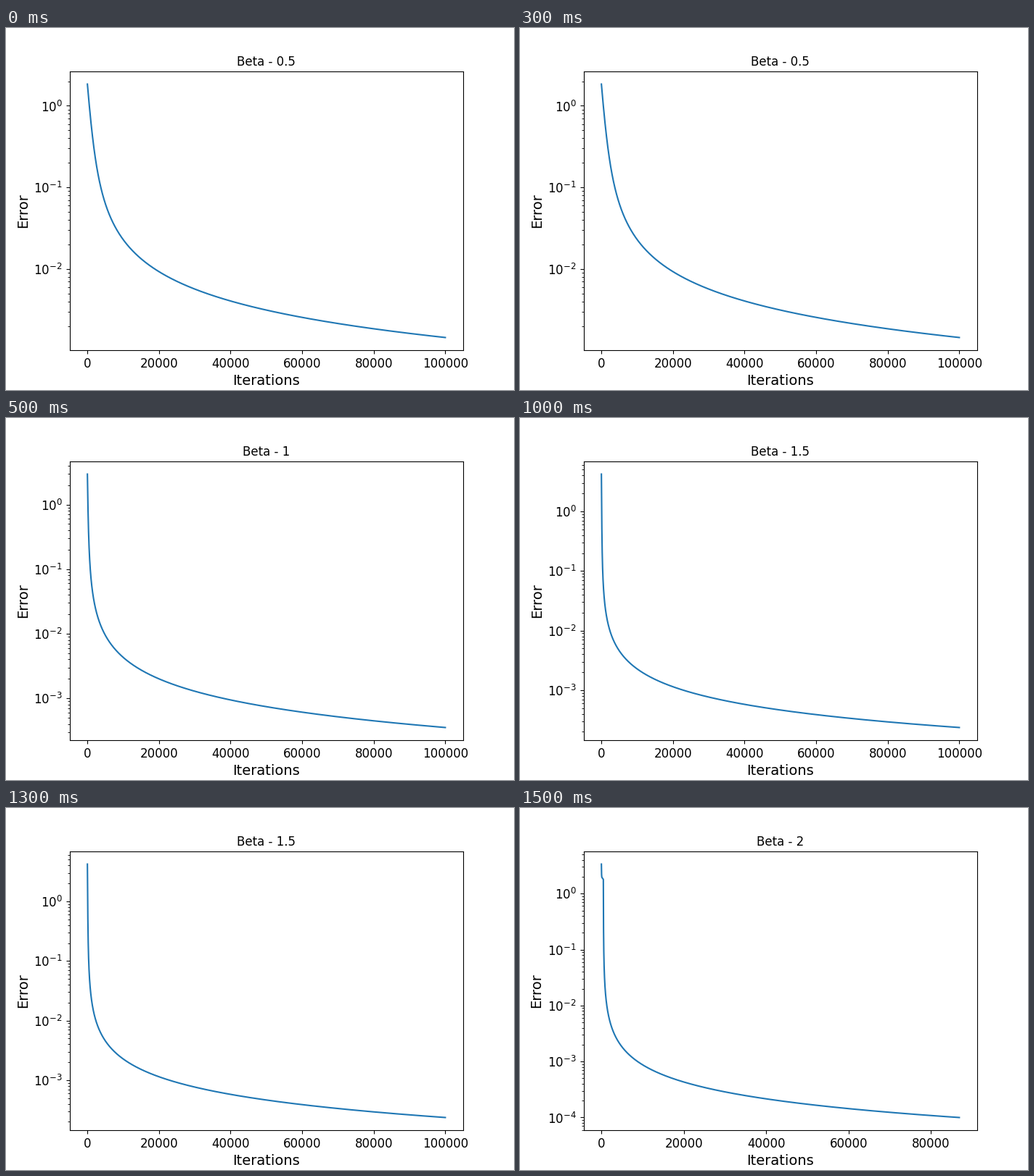
Animation of 700 by 500 pixels, one loop 2000 ms. Source, as a matplotlib script:

```python
import numpy as np
import matplotlib.pyplot as plt
from matplotlib.animation import FuncAnimation

plt.rcParams["font.family"] = "DejaVu Sans"


def decay(first, last, steps, power, tau):
    """Error falling exponentially (time scale tau), then as n**-power."""
    total = np.log(first / last)
    drop = np.linspace(0, total, 2000)
    scale = (steps - tau * total) / np.expm1(total / power)
    return tau * drop + scale * np.expm1(drop / power), first * np.exp(-drop)


def plateau(first, level, last, steps):
    """Quick drop to a shelf that sinks slowly towards the last value."""
    n = np.linspace(0, steps, 400)
    shelf = level + (last - level) * n / steps
    return n, shelf + (first - level) * np.exp(-n / 25)


def stalled_decay(first, level, edge, last, stall, steps, power, tau):
    n1, e1 = plateau(first, level, edge, stall)
    n2, e2 = decay(edge, last, steps - stall, power, tau)
    return np.append(n1, n2 + stall), np.append(e1, e2)


RUNS = [
    ("0.5", decay(1.845, 1.452e-3, 100000, 1.05, 746)),
    ("1", decay(2.958, 3.524e-4, 100000, 1.06, 100)),
    ("1.5", decay(4.227, 2.36e-4, 100000, 0.97, 46)),
    ("2", stalled_decay(3.373, 2.0, 1.8, 0.9999e-4, 470, 86850, 0.98, 12)),
]

fig, ax = plt.subplots(figsize=(7, 5), dpi=100)


def draw(i):
    beta, (steps, error) = RUNS[i]
    ax.clear()
    ax.semilogy(steps, error, color="#1f77b4", lw=1.5)
    ax.set_title(f"Beta - {beta}", fontsize=12)
    ax.set_xlabel("Iterations", fontsize=14)
    ax.set_ylabel("Error", fontsize=14)
    ax.tick_params(labelsize=12)


anim = FuncAnimation(fig, draw, frames=len(RUNS), init_func=lambda: None,
                     interval=500, repeat=True, repeat_delay=0)
plt.show()
```
